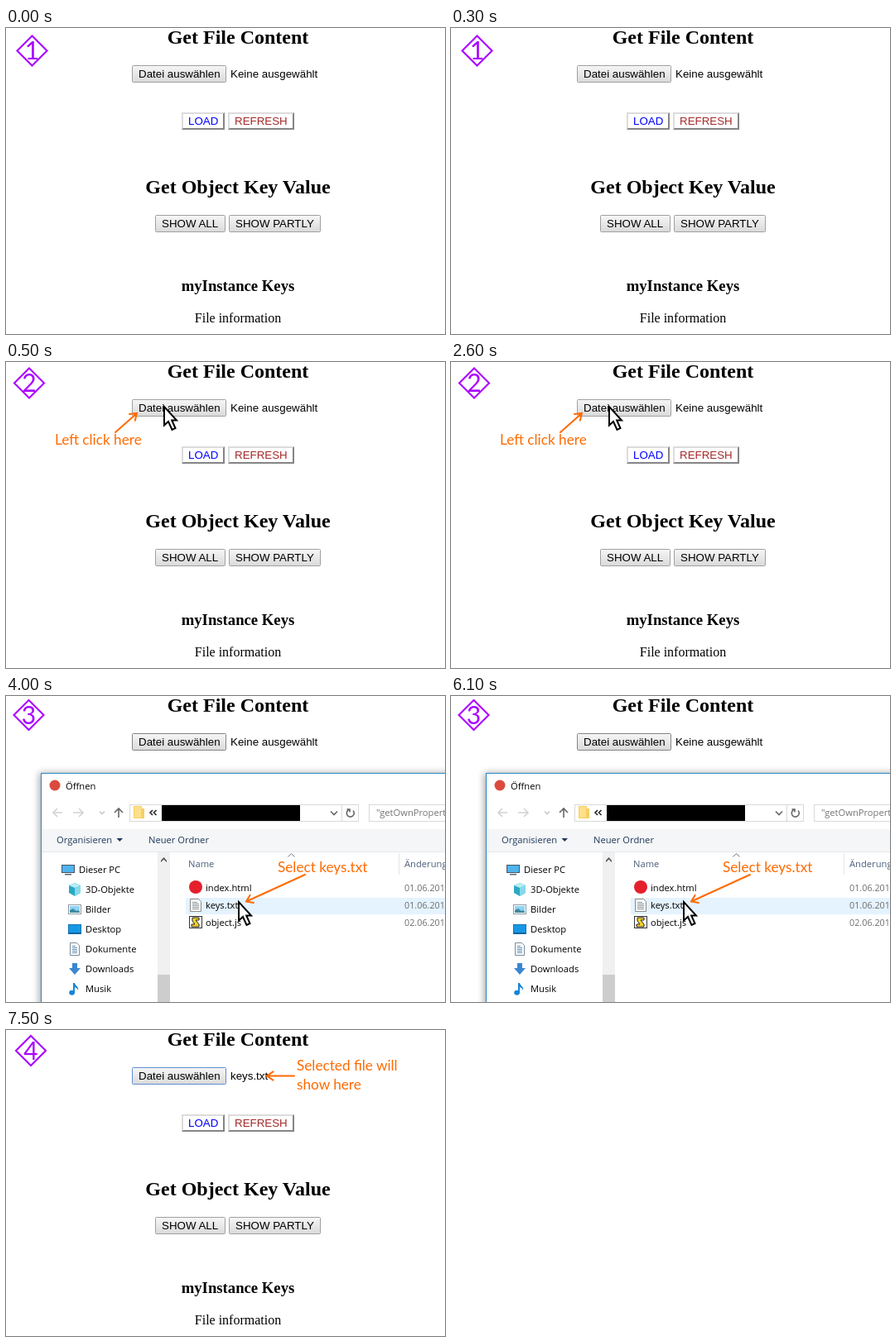
These frames come from a looping animation (530 px wide and 370 px high, 8 s). An HTML page:

```html
<!DOCTYPE html>
<html lang="de">
<head>
<meta charset="utf-8">
<title>Select a file</title>
<style>
  html, body { margin: 0; width: 100%; height: 100%; overflow: hidden; background: #fff; }
  svg { display: block; }
  text { white-space: pre; }
  .serif { font-family: "Liberation Serif", serif; text-anchor: middle; }
  .bold { font-weight: bold; }
  .sans { font: 13.333px "Liberation Sans", sans-serif; }
  .ui { font: 11.2px "Open Sans", sans-serif; }
  .note { font: 17.2px Lato, sans-serif; fill: #ff6a00; }
  .arrow { fill: none; stroke: #ff6a00; stroke-width: 2; stroke-linecap: round; }
  .badge { fill: none; stroke: #aa00ff; stroke-width: 2.1; }
  .digit { font: 30px Lato, sans-serif; fill: #aa00ff; text-anchor: middle; }
  .line { fill: none; stroke-width: 1.6; }
  .thin { stroke-width: 1; }
  .shadow { filter: blur(4px); opacity: .35; }
</style>
</head>
<body>
<svg id="stage" width="530" height="370" viewBox="0 0 530 370">
  <defs>
    <linearGradient id="face" x2="0" y2="1">
      <stop stop-color="#f6f6f6"/><stop offset="1" stop-color="#dadada"/>
    </linearGradient>
  </defs>
</svg>
<script>
const stage = document.getElementById('stage');

const text = (cls, x, y, str, attrs = '') => `<text class="${cls}" x="${x}" y="${y}" ${attrs}>${str}</text>`;
const rect = (x, y, w, h, fill, attrs = '') =>
  `<rect x="${x}" y="${y}" width="${w}" height="${h}" fill="${fill}" ${attrs}/>`;
const path = (d, fill, attrs = '') => `<path d="${d}" fill="${fill}" ${attrs}/>`;
const line = (d, color, cls = '') => `<path class="line ${cls}" d="${d}" stroke="${color}"/>`;
const circle = (x, y, r, fill) => `<circle cx="${x}" cy="${y}" r="${r}" fill="${fill}"/>`;
const at = (x, y, content) => `<g transform="translate(${x} ${y})">${content}</g>`;
// Scenes are listed by index, e.g. "03" is visible in the first and the last.
const show = (scenes, content) => `<g data-scenes="${scenes}">${content}</g>`;

const button = (x, y, w, label, border = '#a0a0a0') =>
  rect(x + .5, y + .5, w - 1, 20, 'url(#face)', `stroke="${border}" rx="1"`) +
  text('sans', x + 8, y + 15, label);

const outsetButton = (x, y, w, label, color) =>
  rect(x, y, w, 21, '#dcdcdc') +
  path(`M${x} ${y + 21}l2-2h${w - 4}v-17l2-2v21z`, '#858585') +
  rect(x + 2, y + 2, w - 4, 17, '#fff') +
  text('sans', x + 8, y + 15, label, `fill="${color}"`);

const badge = (x, y, digit) =>
  `<path class="badge" d="M${x} ${y - 18}l18 18-18 18-18-18z"/>` +
  text('digit', x, y + 10.5, digit);

function arrow(x1, y1, x2, y2) {
  const angle = Math.atan2(y2 - y1, x2 - x1);
  const barb = side => {
    const a = angle + Math.PI + side * .6;
    return `${x2 + 9 * Math.cos(a)} ${y2 + 9 * Math.sin(a)}`;
  };
  return `<path class="arrow" d="M${x1} ${y1}L${x2} ${y2}M${barb(1)}L${x2} ${y2}L${barb(-1)}"/>`;
}

const cursor = (x, y) => at(x, y,
  path('M1 1V23.5L6 19l4.5 10 4-2-4.3-9.5H16z', '#fff', 'stroke="#000" stroke-width="2"'));

const sheet = at(222, 245,
  path('M.5.5h10l3 3v12h-13z', '#fafafa', 'stroke="#8a8a8a"') +
  line('M3 4.5h6M3 6.5h8M3 8.5h8M3 10.5h8M3 12.5h8', '#8d979e', 'thin'));

const script = at(221, 266,
  rect(.5, .5, 15, 14, '#fff', 'stroke="#333"') +
  path('M4 2h8v3H8l4 5v3H3v-3h4L4 6z', '#f5d327', 'stroke="#222"'));

// Sidebar icons, each drawn in a box of 16 by 16.
const places = [
  ['Dieser PC', rect(.5, 2.5, 15, 9, '#4fb4ee', 'stroke="#456"') + rect(4, 13, 8, 1.5, '#567')],
  ['3D-Objekte', path('M8 0l7 3v9l-7 4-7-4V3z', '#29a9c5') + path('M8 6l7-3v9l-7 4z', '#86d9e8') +
    path('M8 0l7 3-7 3-7-3z', '#b7edf3')],
  ['Bilder', rect(.5, 2.5, 15, 11, '#fff', 'stroke="#8a9aa5"') + rect(2, 4, 12, 8, '#91d2f4') +
    path('M2 12V9l4-2 4 3 2-1 2 2v1z', '#3f8a9f')],
  ['Desktop', rect(.5, 2.5, 15, 11, '#1798e5', 'stroke="#1273b5"') + rect(1, 12, 14, 1.5, '#155f94')],
  ['Dokumente', path('M2.5.5h8l3 3v12h-11z', '#fff', 'stroke="#7c8b96"') +
    line('M5 4.5h4M5 6.5h6M5 8.5h6M5 10.5h6M5 12.5h6', '#5f8fb5', 'thin')],
  ['Downloads', path('M5 1h6v6h4l-7 8-7-8h4z', '#3b86d0')],
  ['Musik', path('M6 1l2 0c1 4 5 4 4 9-1-3-2-3-4-4v6a3.5 3 0 1 1-2-2z', '#1685d9')]
];
const sidebar = places.map(([label, icon], i) => {
  const indent = i ? 8 : 0, y = 214 + 24 * i;
  return at(67 + indent, y - 12, icon) + text('ui', 88 + indent, y, label);
}).join('');

const fileRow = (y, name, date) =>
  text('ui', 241, y, name) + text('ui', 481, y, date, 'fill="#6d6d6d" style="font-size:10.8px"');

const dialog =
  rect(40, 93, 520, 300, '#000', 'class="shadow"') +
  rect(42.5, 93.5, 500, 300, '#fff', 'stroke="#2b88c8"') +
  circle(59, 108, 6.5, '#db4b3d') +
  text('ui', 72, 113, 'Öffnen') +
  // Navigation bar
  line('M68 141H57m5-5l-5 5 5 5M81 141h12m-5-5l5 5-5 5', '#d2d2d2') +
  line('M113 139.5l3 3 3-3', '#c8c8c8') +
  line('M136 147v-11m-5 5l5-5 5 5', '#666') +
  rect(149.5, 131.5, 276, 20, '#fff', 'stroke="#d9d9d9"') +
  path('M154 133h10v3h3v12h-13z', '#f5cf62') + path('M155 134h8v13h-8z', '#ffe08a') +
  line('M177 138l-3 3 3 3M181.500 138l-3 3 3 3', '#222') +
  rect(188, 132, 167, 19, '#000') +
  line('M392 139.5l4 4 4-4', '#666') +
  rect(405, 132, 1, 19, '#d9d9d9') +
  line('M419 138.500a4.5 4.5 0 1 1-5-1M411.500 137h3.500v3.500', '#666') +
  rect(438.5, 131.5, 120, 20, '#fff', 'stroke="#d9d9d9"') +
  text('ui', 447, 145, '"getOwnPropertyNames" durchsuchen', 'fill="#757575"') +
  // Toolbar
  rect(43, 161, 487, 28, '#f5f6f7') + rect(43, 188, 487, 1, '#e6e8ea') +
  text('ui', 61, 178, 'Organisieren', 'fill="#1e395b"') +
  path('M133.5 172h7.5l-3.75 4z', '#1e395b') +
  text('ui', 172, 178, 'Neuer Ordner', 'fill="#1e395b"') +
  // Sidebar with scrollbar
  sidebar +
  rect(183, 189, 15, 181, '#f0f0f0') + rect(183, 337, 15, 33, '#cdcdcd') +
  path('M187 199l3.5-4 3.5 4v2l-3.5-3.500-3.500 3.500z', '#505050') +
  // File list
  text('ui', 220, 207, 'Name', 'fill="#4c607a"') +
  line('M340.5 194.500l4-4 4 4', '#777', 'thin') +
  rect(474, 190, 1, 26, '#e5e5e5') +
  text('ui', 481, 207, 'Änderungsdatum', 'fill="#4c607a"') +
  rect(217, 244, 313, 20, '#e5f3ff') +
  circle(229, 231, 8, '#e3202c') + sheet + script +
  fileRow(236, 'index.html', '01.06.2019') +
  fileRow(257, 'keys.txt', '01.06.2019') +
  fileRow(278, 'object.js', '02.06.2019');

stage.insertAdjacentHTML('beforeend',
  text('serif bold', 280, 19, 'Get File Content', 'font-size="24"') +
  show('01', button(152, 45, 114, 'Datei auswählen')) +
  show('2', button(152, 45, 114, 'Datei auswählen', '#858585')) +
  show('3', button(152, 45, 114, 'Datei auswählen', '#5f8fd0')) +
  show('012', text('sans', 271, 60, 'Keine ausgewählt')) +
  show('3', text('sans', 271, 60, 'keys.txt')) +
  outsetButton(212, 102, 52, 'LOAD', '#0000ff') +
  outsetButton(268, 102, 80, 'REFRESH', '#a52a2a') +
  text('serif bold', 280, 200, 'Get Object Key Value', 'font-size="24"') +
  button(180, 226, 85, 'SHOW ALL') +
  button(269, 226, 111, 'SHOW PARTLY') +
  text('serif bold', 280, 318, 'myInstance Keys', 'font-size="18.72"') +
  text('serif', 280, 356, 'File information', 'font-size="16"') +
  show('0', badge(31.5, 27.5, 1)) +
  show('1', badge(28, 25.5, 2) +
    text('note', 59, 100, 'Left click here') + arrow(132, 85, 158, 62) + cursor(190, 53)) +
  show('2', dialog + badge(27.5, 23, 3) +
    text('note', 328, 213, 'Select keys.txt') + arrow(361, 216, 290, 248.5) + cursor(280, 248)) +
  show('3', badge(30, 25, 4) +
    text('note', 351, 49, 'Selected file will') + text('note', 351, 72, 'show here') +
    arrow(348, 55.5, 315, 55.5)));

const duration = 8000;
const cuts = [500, 4000, 7500];
const layers = [...stage.querySelectorAll('[data-scenes]')];

function render() {
  const time = performance.now() % duration;
  const scene = cuts.filter(cut => time >= cut).length;
  for (const layer of layers)
    layer.style.display = layer.dataset.scenes.includes(scene) ? '' : 'none';
  requestAnimationFrame(render);
}
render();
</script>
</body>
</html>
```
